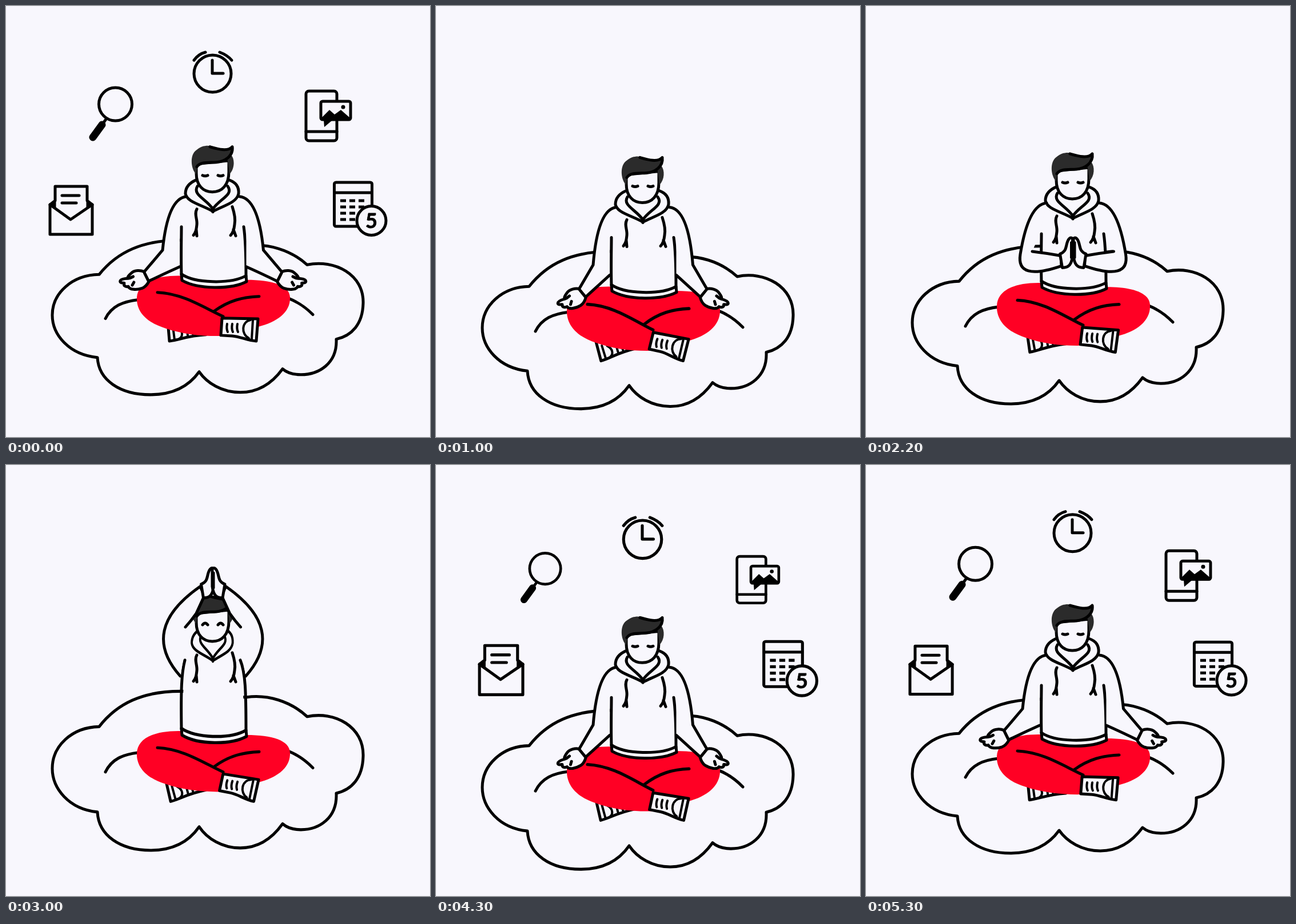
Recreate the animation shown at these times as an HTML page. Size 742 by 755 pixels, loop 5400 ms.

```html
<!DOCTYPE html>
<html lang="en">
<head>
<meta charset="utf-8">
<title>Meditation on a cloud</title>
<style>
html, body { margin: 0; width: 100%; height: 100%; overflow: hidden; background: #f8f7fd; }
svg { display: block; width: 100vw; height: 100vh; }
.ink { fill: none; stroke: #000; stroke-width: 5; stroke-linecap: round; stroke-linejoin: round; }
.paper { fill: #f8f7fd; }
.solid { fill: #000; }
.bare { stroke: none; }
text { font: 700 36px Lato, "Open Sans", sans-serif; text-anchor: middle; stroke-width: .8; fill: #000; }
</style>
</head>
<body>
<svg viewBox="0 0 742 755" class="ink">
  <g id="cloud">
    <path class="paper" d="M163 470C195 430 240 410 305 410C350 410 385 420 421 420C458 415 498 427 527 453C575 443 627 470 625 521C624 557 605 577 578 583C580 625 548 645 516 645C503 645 491 641 484 635C462 665 437 676 410 676C378 676 352 660 338 640C318 668 288 680 253 680C200 680 162 655 160 615C110 610 81 575 81 541C81 503 115 471 163 470Z"/>
    <path d="M174 547C185 525 205 517 232 514M495 512C513 519 526 529 537 540"/>
  </g>

  <g id="shoeL">
    <path class="paper" d="M283 550L286 586C305 584 315 577 350 575L350 550Z"/>
    <path d="M292 560L295 584M301 562C311 569 309 579 303 582M317 567L318 576M326 565L327 574" stroke-width="4"/>
  </g>
  <g id="pants">
    <path class="bare" fill="#ff0024" d="M306 472L421 479C465 479 497 488 497 510C498 535 475 553 441 561L380 577C345 578 310 574 280 564C240 552 228 530 229 510C230 487 255 471 306 472Z"/>
    <path d="M265 501C310 503 345 527 380 543M364 534C390 515 415 509 443 508"/>
  </g>
  <g id="shoeR">
    <path class="paper" d="M378 545L441 546L438 585C422 584 410 577 396 576L376 575Z"/>
    <path d="M387 555C386 560 386 565 388 569M396 555C395 560 395 565 397 569M405 555C404 560 404 565 406 569M428 548C412 551 411 573 425 580M432 548L430 582" stroke-width="4"/>
  </g>

  <g id="torso">
    <path id="trunk" class="paper bare"/>
    <path id="sides"/>
    <path class="paper" d="M307 469C330 485 392 487 420 472L421 482C394 496 336 496 308 480Z"/>
  </g>

  <g id="head">
    <path id="strings" d="M334 355C329 364 335 372 334 382C333 392 332 396 328 401M333 391L334 402M396 351C399 360 402 372 400 382C399 392 397 397 393 401M398 391L402 402"/>
    <g id="hood">
      <path class="paper" d="M333 304C319 310 314 318 314 328C316 343 344 348 362 359C381 349 404 344 407 328C408 316 402 308 390 304Z"/>
      <path d="M335 315C326 330 350 337 362 355C374 337 399 330 388 315M362 356V360"/>
    </g>
    <path class="paper" d="M333 276V292C333 314 345 325 361 325C378 325 390 313 390 290V270Z"/>
    <path class="bare" fill="#2b2b2b" d="M333 294C323 285 321 259 334 251C345 242 357 243 366 247C378 251 390 252 396 246C398 253 396 257 394 260C401 268 400 285 391 294L387 265C375 277 350 270 340 276C335 279 334 286 333 294Z"/>
    <path d="M357 246C371 250 388 255 396 246C398 262 383 272 368 273C354 274 340 272 334 281"/>
    <path id="eyes"/>
  </g>

  <g id="arms">
    <g id="arm">
      <path id="sleeve" class="paper bare"/>
      <path id="seams"/>
      <g id="hand">
        <path class="paper" d="M-4 -9C-10 -12 -20 -12 -25 -8C-30 -4 -34 0 -32 2C-40 2 -46 3 -46 7C-45 10 -42 9 -39 10C-41 15 -36 17 -32 16C-30 22 -18 23 -8 20C-2 18 1 14 4 9ZM-32 2C-28 2 -25 0 -23 -1M-25 14L-22 9"/>
        <path class="paper" d="M-2 -12C8 -16 8 -22 10 -30C12 -38 16 -43 20 -39L20 -8C18 6 14 12 2 12ZM18 -32V-6"/>
        <path class="paper" d="M8 -5C8 -14 2 -22 -6 -25L-14 -24C-20 -28 -28 -36 -33 -31C-34 -22 -26 -14 -18 -7L-7 5ZM-6 -25L-17 -28"/>
      </g>
    </g>
    <use href="#arm" transform="translate(724.5) scale(-1 1)"/>
  </g>

  <g id="clock">
    <circle class="paper" cx="361.500" cy="118.500" r="32.500"/>
    <path d="M361 95V118H380M329 95C334 88 341 83 349 81M374 81C382 84 390 89 395 95"/>
  </g>
  <g id="lens">
    <circle cx="191.500" cy="172" r="29"/>
    <path d="M176 197L168 208"/>
    <path d="M168 208L152 230" stroke-width="13"/>
  </g>
  <g id="phone">
    <rect class="paper" x="525" y="149" width="54" height="87" rx="5"/>
    <path d="M525 220H579"/>
    <rect class="paper" x="551" y="167" width="52" height="32" rx="3"/>
    <path class="solid bare" d="M552 196L566 182L575 190L586 182L602 196V201H570L557 212L556 200H552Z"/>
    <circle class="solid bare" cx="590" cy="177" r="3.500"/>
  </g>
  <g id="mail">
    <path class="paper" d="M77 348V400H151V348L142 341V316H86V341Z"/>
    <path class="solid" d="M77 348L86 341V354ZM151 348L142 341V354Z" stroke-width="3"/>
    <path d="M77 348L113 374L151 348M98 332H128M98 345H123"/>
  </g>
  <g id="date">
    <rect class="paper" x="574.500" y="309" width="66" height="77" rx="3"/>
    <path d="M575 327H640"/>
    <path d="M585 341H627M585 352H627M585 363H627M585 374H627" stroke-dasharray="10 6" stroke-linecap="butt"/>
    <circle class="paper" cx="639.500" cy="376" r="25.500"/>
    <text x="639.500" y="388.500">5</text>
  </g>
</svg>
<script>
const LOOP = 5400, BREATH = 1800, STEP = 100;
const $ = id => document.getElementById(id);
const attr = (id, value, name = 'd') => $(id).setAttribute(name, value);
const move = (id, value) => attr(id, value, 'transform');
const mix = (a, b, u) => a + (b - a) * u;

const ease = (t, from, to) => {
  const s = Math.min(1, Math.max(0, (t - from) / (to - from)));
  return s * s * (3 - 2 * s);
};
// Breathing between 0 and 1, highest at the peak time
const breath = (t, peak) => .5 + .5 * Math.cos((t - peak) / BREATH * 2 * Math.PI);
// One upward pull while the arms are raised
const pull = (t, lag) => ease(t, 2550, 3000) * (1 - ease(t, 3000 + lag, 4100 + lag));
const bob = (t, size, lift, peak = 800, lag = 150) => size * breath(t, peak) - lift * pull(t, lag);

// Left arm: start, bend and elbow of the outer seam; wrist and cuff angle;
// bend and end of the inner seam
const knees = {
  hand: 0, start: [316, 333], bend: [283, 336], elbow: [274, 427], curl: 0,
  wrist: [245.5, 473.5], cuff: 63, under: [275, 469], end: [304, 456], raise: 0
};
const low = {
  ...knees, elbow: [275, 434], wrist: [256, 483.5], cuff: 50, under: [280, 474], end: [304, 452]
};
const pray = {
  hand: 1, start: [316, 332], bend: [284, 335], elbow: [270, 422], curl: .55,
  wrist: [341.5, 433.5], cuff: 267, under: [316, 420], end: [291, 417], raise: 0
};
const up = {
  hand: 1, start: [314, 300], bend: [324, 289], elbow: [333, 276], curl: 0,
  wrist: [343.5, 237], cuff: 246, under: [232, 304], end: [305, 386], raise: 1
};
const open = {
  hand: 2, start: [317, 333], bend: [272, 324], elbow: [237, 334], curl: 0,
  wrist: [181.5, 314.5], cuff: 149, under: [212, 390], end: [307, 381], raise: .5
};

const acts = [
  [0, knees], [900, low], [1250, low], [1850, pray], [2450, pray], [3000, up], [3200, up],
  [3800, open], [4300, low], [4500, low], [5300, knees], [LOOP, knees]
];

function blend(a, b, u) {
  const p = { hand: (u < .5 ? a : b).hand };
  for (const k of ['start', 'bend', 'elbow', 'wrist', 'under', 'end'])
    p[k] = a[k].map((v, i) => mix(v, b[k][i], u));
  for (const k of ['curl', 'raise']) p[k] = mix(a[k], b[k], u);
  const turn = (b.cuff - a.cuff + 540) % 360 - 180;
  p.cuff = a.cuff + turn * u;
  return p;
}

function currentPose(t) {
  const i = acts.findLastIndex(a => a[0] <= t);
  const [from, a] = acts[i], [to, b] = acts[i + 1];
  return blend(a, b, ease(t, from, to));
}

// Shifts height y0 by d0 and y1 by d1, linear between
function stretch(id, y0, d0, y1, d1) {
  const k = (d1 - d0) / (y1 - y0);
  move(id, `matrix(1 0 0 ${1 + k} 0 ${d0 - k * y0})`);
}

function drawArms(p, pit) {
  const a = p.cuff * Math.PI / 180, dx = 9 * Math.cos(a), dy = 9 * Math.sin(a);
  const [x, y] = p.wrist;
  const curl = p.elbow.map((v, i) => v + (v - p.bend[i]) * p.curl);
  // A straight forearm aims its curve at the wrist
  const outer = `M${p.start}Q${p.bend} ${p.elbow}Q${curl} ${x - dx} ${y - dy}`;
  const inner = `L${x + dx} ${y + dy}Q${p.under} ${p.end}`;
  attr('seams', outer + inner);
  attr('sleeve', `${outer}${inner}L${pit}Z`);
  move('hand', `translate(${x} ${y}) rotate(${p.hand ? 0 : p.cuff - 65})`);
  [...$('hand').children].forEach((h, k) => h.style.display = k === p.hand ? '' : 'none');
}

const icons = [
  { id: 'clock', x: 361, y: 118, start: 3450, peak: 930, size: 14 },
  { id: 'lens', x: 184, y: 190, start: 3700, peak: 1030, size: 13 },
  { id: 'phone', x: 552, y: 192, start: 3700, peak: 1030, size: 13 },
  { id: 'mail', x: 113, y: 358, start: 3900, peak: 1200, size: 8 },
  { id: 'date', x: 607, y: 350, start: 3900, peak: 1200, size: 8 }
];
const spring = u => u < 0 ? 0 : 1 - Math.exp(-u / 230) * Math.cos(u / 550 * 2 * Math.PI);
const backOut = s => s < 0 ? 1 : s > 1 ? 0 : 1 - s * s * (2.7 * s - 1.7);

function drawIcon({ id, x, y, start, peak, size }, t) {
  const scale = t < 2000 ? backOut((t - 550) / 430) : spring(t - start);
  const dy = size * (breath(t, peak) - breath(0, peak));
  $(id).style.display = scale > 0 ? '' : 'none';
  move(id, `translate(${x} ${y + dy}) scale(${scale}) translate(${-x} ${-y})`);
}

function draw(t) {
  const top = bob(t, 21.5, 28, 850, 250), bottom = bob(t, 29, 22);
  const hem = bob(t, 22, 19), head = bob(t, 22, 29);
  const foot = 10 * breath(t, 950);
  const p = currentPose(t), r = p.raise;

  stretch('cloud', 411, top, 680, bottom);
  stretch('pants', 471, hem, 560, bottom);
  stretch('torso', 358, head, 490, hem);
  move('shoeL', `translate(0 ${bottom}) rotate(${-foot} 345 575)`);
  move('shoeR', `translate(0 ${bottom + 1}) rotate(${foot} 378 558)`);
  move('head', `translate(0 ${head})`);
  move('arms', `translate(0 ${head})`);
  move('hood', `translate(362) scale(${1 - .23 * r * r} 1) translate(-362)`);
  move('strings', `translate(0 ${-6 * r})`);

  const x = 307 + 6 * r, y = 386 - 28 * r, right = 723 - x;
  attr('sides', `M${x} ${y}C307 ${y + 20} 306 ${y + 50} 307 470M${right} ${y}C419 ${y + 20} 420 ${y + 50} 420 473`);
  attr('trunk', `M${x} ${y}L325 340H400L${right} ${y}L420 473Q362 500 307 470Z`);
  const eye = x => `M${x} 296q4.500 ${2 - 8 * r} 9 0`;
  attr('eyes', eye(344) + eye(371));

  drawArms(p, [x - 3, y]);
  icons.forEach(icon => drawIcon(icon, t));
}

const began = performance.now();
function tick() {
  const t = (performance.now() - began) % LOOP;
  draw(Math.floor(t / STEP) * STEP);
  requestAnimationFrame(tick);
}
tick();
</script>
</body>
</html>
```
